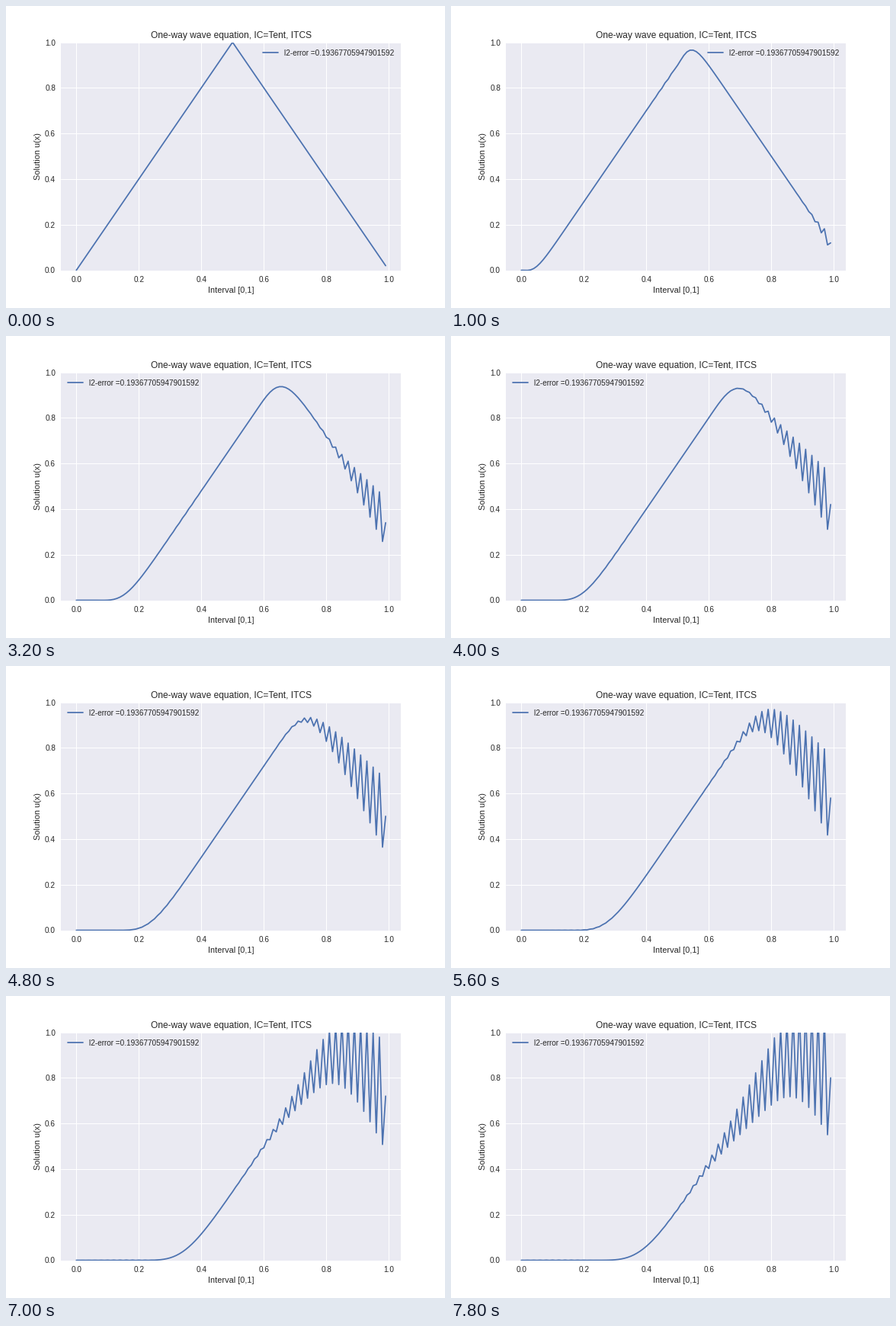
A matplotlib script that plays this animation: 576 px wide and 396 px high, repeating every 8000 ms.

```python
import numpy as np
import matplotlib.pyplot as plt
from matplotlib.animation import FuncAnimation

STEPS = 40
POINTS = 100
H = 1 / POINTS
CFL = 1.0


def tent(x):
    return 1 - np.abs(2 * x - 1)


def solve():
    """Implicit in time, centered in space, with both end values reset each step."""
    x = np.arange(POINTS) * H
    off = CFL / 2 * np.ones(POINTS - 1)
    matrix = np.eye(POINTS) + np.diag(off, 1) - np.diag(off, -1)
    rows = [tent(x)]
    for n in range(1, STEPS):
        u = np.linalg.solve(matrix, rows[-1])
        u[0] = 0
        u[-1] = tent(x[-1] - n * CFL * H)
        rows.append(u)
    return x, rows


plt.style.use("seaborn-v0_8")
plt.rcParams["font.family"] = "Liberation Sans"

x, rows = solve()
fig = plt.figure(figsize=(8, 5.5), dpi=72, facecolor="white")
fig.subplots_adjust(left=0.125, right=0.9, bottom=0.125, top=0.88)
ax = fig.add_subplot()
line, = ax.plot(x, rows[0], label="l2-error =0.19367705947901592")
ax.set_ylim(0, 1)
ax.set_title("One-way wave equation, IC=Tent, ITCS")
ax.set_xlabel("Interval [0,1]")
ax.set_ylabel("Solution u(x)")
legend = ax.legend(loc="upper right")


def draw(n):
    line.set_ydata(rows[n])
    legend.set_loc("upper right" if n < 6 else "upper left")
    return line, legend


anim = FuncAnimation(fig, draw, frames=STEPS, interval=200,
                     repeat=True, repeat_delay=0, blit=False)
plt.show()
```
